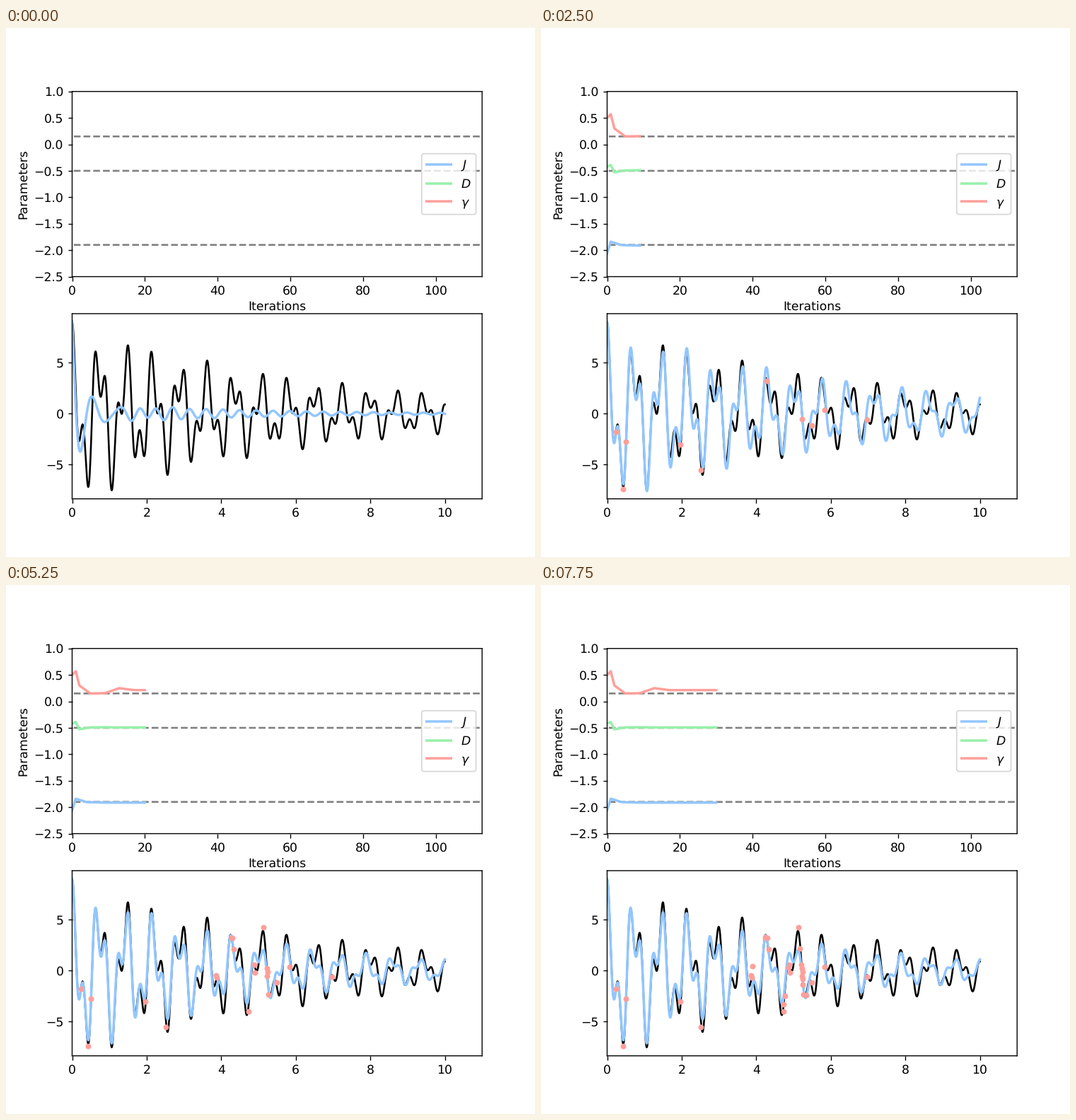
Animation, 748 px wide and 748 px high, one loop 8000 ms. Source, as a matplotlib script:

```python
import numpy as np
import matplotlib.pyplot as plt
from matplotlib.animation import FuncAnimation

# Unhinted text and unsnapped lines keep true sub-pixel positions
plt.rcParams["text.hinting"] = "no_hinting"
plt.rcParams["path.snap"] = False

SIZE = 748
FRAMES, INTERVAL = 32, 250
BLUE, GREEN, RED = "#92C6FF", "#97F0AA", "#FF9F9A"
TRUE_J, TRUE_D, TRUE_G = -1.9, -0.5, 0.15

steps = np.arange(FRAMES - 1)
t = np.linspace(0, 10, 1000)

# Parameter estimates settle quickly; only their bends are given
J = np.interp(steps, [0, 1, 4, 9], [-2.06, -1.84, -1.904, -1.914])
D = np.interp(steps, [0, 1, 2, 5, 9, 12], [-.42, -.39, -.528, -.492, -.488, -.492])
G = np.interp(steps, [0, 1, 2, 5, 9, 13, 17], [.5, .57, .3, .15, .155, .25, .213])

# Remaining uncertainty of the two oscillation frequencies
spread1 = 1.6 * np.exp(-steps / 1.8)
spread2 = 0.08 + 5 * np.exp(-steps / 1.5)


def signal(t, j, d, g, s1=0, s2=0, sg=0):
    """Two damped cosines, averaged over the given parameter spreads."""
    w1 = 8.667 + 7 * (TRUE_J - j)
    w2 = w1 + 12.141 + 24.3 * (TRUE_D - d)
    slow = 5.55 * np.cos(w1 * t) * np.exp(-(s1 * t) ** 2 / 2)
    fast = 3.45 * np.cos(w2 * t) * np.exp(-(s2 * t) ** 2 / 2)
    return (slow + fast) * np.exp(-g * t + (sg * t) ** 2 / 2)


def truth(t):
    return signal(t, TRUE_J, TRUE_D, TRUE_G)


def prior(t):
    """Signal before any measurement: a fast drop and fading ripples."""
    drop = 9 * np.exp(-6 * t) * np.cos(11 * t)
    slow = 2.7 * np.exp(-1.3 * t) * np.cos(8.7 * (t - 0.545))
    rise = 1 - np.exp(-(t / 1.7) ** 4)
    return drop + slow + 1.1 * rise * np.exp(-t / 4) * np.cos(14 * (t - 2.25))


def take_shots():
    """Explore the whole signal first, then return to a few useful times."""
    rng = np.random.default_rng(4)
    explore = [.42, .23, .51, 1.96, 2.51, 4.28, 5.23, 5.49, 5.84, 6.97]
    hubs = [4.91, 5.27, 4.29, 3.86, 5.19, 5.24, 4.75]
    revisit = np.resize(hubs, len(steps) - len(explore))
    times = np.concatenate([explore, revisit + rng.normal(0, .03, len(revisit))])
    return times, truth(times) + rng.normal(0, .5, len(times))


shot_t, shot_y = take_shots()

fig, (top, bottom) = plt.subplots(2, 1, figsize=(6, 6), dpi=SIZE / 6)

for level in (TRUE_G, TRUE_D, TRUE_J):
    top.plot([0.45, 112.77], [level, level], "--", color="gray", lw=1.5)
traces = [top.plot([], [], color=c, lw=2, label=name)[0]
          for c, name in ((BLUE, "$J$"), (GREEN, "$D$"), (RED, r"$\gamma$"))]
top.set(xlim=(0, 112.77), ylim=(-2.5, 1), xlabel="Iterations", ylabel="Parameters")
top.legend(loc="center right")

bottom.plot(t, truth(t), color="black", lw=1.5)
estimate, = bottom.plot([], [], color=BLUE, lw=2)
dots, = bottom.plot([], [], "o", color=RED, ms=3.6)
bottom.set(xlim=(0, 11), ylim=(-8.37, 9.83), yticks=(-5, 0, 5))


def update(n):
    for line, values in zip(traces, (J, D, G)):
        line.set_data(steps[:n], values[:n])
    dots.set_data(shot_t[:n], shot_y[:n])
    if n == 0:
        curve = prior(t)
    else:
        k = n - 1
        curve = signal(t, J[k], D[k], G[k], spread1[k], spread2[k], 0.06)
    estimate.set_data(t, curve)
    return (*traces, dots, estimate)


anim = FuncAnimation(fig, update, frames=FRAMES, interval=INTERVAL,
                     init_func=lambda: update(0), repeat=True, repeat_delay=0)
plt.show()
```
